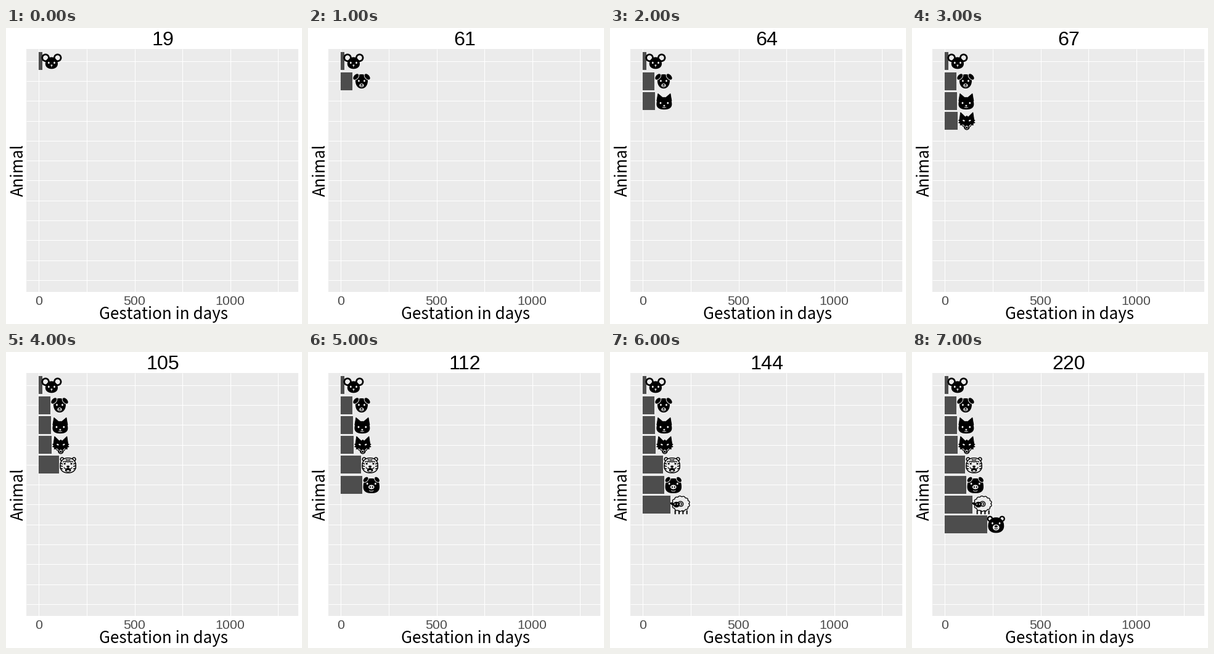
Recreate the animation shown at these times as a matplotlib script. Size 480 by 480 pixels, loop 8000 ms.

```python
import numpy as np
import matplotlib.pyplot as plt
from matplotlib.animation import FuncAnimation
from matplotlib.patches import Ellipse, Polygon, Rectangle

SIZE, DPI = 480, 72
PANEL, BAR, INK = "#EBEBEB", "#4D4D4D", "black"
LEFT, RIGHT, TOP, BOTTOM = 33, 474, 34, 428
ZERO, PER_DAY = 53.4, 0.3104
ROW, STEP = 53.8, 32.28

fig = plt.figure(figsize=(SIZE / DPI, SIZE / DPI), dpi=DPI, facecolor="white")
ax = fig.add_axes([0, 0, 1, 1])
ax.set(xlim=(0, SIZE), ylim=(SIZE, 0))
ax.set_axis_off()


def outline(y, rx, ry, power=2.0, taper=0.0):
    """Rounded head shape; taper widens it towards the chin."""
    t = np.linspace(0, 2 * np.pi, 80, endpoint=False)
    c, s = np.cos(t), np.sin(t)
    px = np.sign(c) * np.abs(c) ** (2 / power)
    py = np.sign(s) * np.abs(s) ** (2 / power)
    return np.c_[rx * px * (1 + taper * py), y + ry * py]


class Icon:
    """Draws shapes placed relative to one centre."""

    def __init__(self, x, y):
        self.centre = np.array([x, y])
        self.parts = []

    def add(self, patch):
        patch.set_zorder(3)
        self.parts.append(ax.add_patch(patch))

    def dot(self, x, y, rx, ry=None, color=INK, angle=0):
        self.add(Ellipse(self.centre + (x, y), 2 * rx, 2 * (ry or rx),
                         angle=angle, fc=color, ec="none"))

    def dots(self, x, y, rx, ry=None, color=INK, angle=0):
        for side in (-1, 1):
            self.dot(side * x, y, rx, ry, color, side * angle)

    def shape(self, points, fill=INK, edge="none", width=0):
        self.add(Polygon(self.centre + points, fc=fill, ec=edge, lw=width,
                         joinstyle="round"))

    def line(self, points, width=1.1, color=INK):
        self.add(Polygon(self.centre + points, closed=False, fill=False, ec=color,
                         lw=width, capstyle="round", joinstyle="round", snap=False))

    def arc(self, x, y, rx, ry, width=1.1, color=INK):
        """Half-ellipse curve; positive ry sags like a smile."""
        t = np.linspace(0, np.pi, 12)
        self.line(np.c_[x + rx * np.cos(t), y + ry * np.sin(t)], width, color)

    def eyes(self, x, y):
        self.dots(x, y, 1.4, 1.7, PANEL)

    def round_ears(self, x, y, r, hole):
        self.dots(x, y, r)
        self.dots(x, y, hole, color=PANEL)

    def pointed_ears(self, x, y):
        for side in (-1, 1):
            ear = np.array([(0.3 * x, y / 2), (x, y), (1.2 * x, 0)]) * (side, 1)
            self.shape(ear, edge=INK, width=1)

    def floppy_ears(self, x, y, rx, ry):
        self.dots(x, y, rx + 1, ry + 1, PANEL, 48)
        self.dots(x, y, rx, ry, angle=48)

    def nose(self, y):
        self.dot(0, y, 1.6, 1, PANEL)
        self.line([(0, y), (0, y + 2.8)], 0.9, PANEL)

    def muzzle(self, y, rx, ry):
        self.dot(0, y, rx, ry, PANEL)
        self.dot(0, y - 0.35 * ry, 0.46 * rx, 0.36 * ry)
        self.arc(0, y + 0.3 * ry, 0.4 * rx, 0.2 * ry)


def mouse(i):
    i.round_ears(9.8, -5.5, 6.7, 4)
    i.shape(outline(3, 10, 9.5, 2.1, 0.1))
    i.eyes(4.6, 2.6)
    i.nose(6.6)


def dog(i):
    i.shape(outline(0.5, 10, 11.5, 2.2, -0.08))
    i.floppy_ears(9.2, -7, 5.6, 3.3)
    i.eyes(4.5, -0.3)
    i.muzzle(7, 3.6, 3)


def cat(i):
    i.pointed_ears(10, -11.8)
    i.shape(outline(3.8, 12.4, 10, 2.4, 0.06))
    i.eyes(5.9, 3.3)
    i.nose(7.4)
    i.arc(0, 10, 2.6, 0.9, 0.8, PANEL)


def wolf(i):
    i.pointed_ears(10, -13.6)
    k = np.arange(28)
    t = np.pi / 2 + 2 * np.pi * k / len(k)
    r = 1 + 0.1 * (-1.0) ** k
    i.shape(np.c_[13 * r * np.cos(t), 1 + 8.8 * r * np.sin(t)])
    i.dot(0, 10, 4.8, 4.8)
    i.dots(4.9, -0.5, 1.9, 1.2, PANEL, -25)
    i.dots(5.2, 7.4, 2.8, 0.6, PANEL, -45)
    i.dot(0, 10.6, 2.4, 2.8, PANEL)
    i.dot(0, 11, 1.7, 1.7)


def tiger(i):
    i.dots(9.6, -9, 3.5)
    i.dots(9.6, -9, 1.9, color=PANEL)
    i.shape(outline(1, 12.6, 12, 2.3, 0.04), PANEL, INK, 1.5)
    for y in (-8.5, -5.8):
        i.arc(0, y, 3.2, 0.9, 1.5)
    for side in (-1, 1):
        i.arc(side * 6, -4.2, 2, -1.4)
        i.arc(side * 3.2, 4.2, 3.2, 2.2, 1.2)
        for y in (-2, 2, 6):
            i.line([(side * 9, y + 0.6), (side * 12.4, y - 0.4)], 1.5)
    i.dots(5.4, -1.8, 1.5)
    i.dot(0, 2.8, 2.5, 1.5)
    i.dot(0, 8.8, 4.8, 3)
    i.dot(0, 9.8, 2.4, 1.2, PANEL)


def pig(i):
    i.shape(outline(1.8, 13.2, 12, 2.5, 0.05))
    i.floppy_ears(9.2, -8.4, 4.8, 3)
    i.eyes(6.6, -1.6)
    i.dot(0, 3.8, 4.8, 3.5, PANEL)
    i.dots(1.9, 3.8, 1, 1.5)
    i.arc(0, 9.4, 3.2, 1.1, 0.9, PANEL)


def sheep(i):
    for x in np.linspace(-7, 12, 4):
        i.line([(x, 10), (x, 14.8)], 2)
    t = np.linspace(0, 2 * np.pi, 145)
    r = 0.91 + 0.11 * np.abs(np.sin(6.5 * t))
    i.line(np.c_[2 + 14.4 * r * np.cos(t), -1.4 + 12.4 * r * np.sin(t)], 1.3)
    i.dot(-12, -1.5, 3.4, 1.9, angle=20)
    i.dot(-5, 0, 5.4, 4.6)
    for x in (-7.4, -3.2):
        i.dot(x, -0.8, 1, color=PANEL)
    t = np.linspace(0, 3.4 * np.pi, 60)
    r = 5 - 0.36 * t
    i.line(np.c_[2 + r * np.cos(t - 2.6), -0.6 + r * np.sin(t - 2.6)], 1.3)


def bear(i):
    i.round_ears(9.8, -9.3, 4.8, 2.5)
    i.shape(outline(1, 12.9, 12.6, 2.2, 0.07))
    i.eyes(5.8, -2)
    i.muzzle(4.8, 5.4, 4.8)


ANIMALS = [(19, mouse), (61, dog), (64, cat), (67, wolf),
           (105, tiger), (112, pig), (144, sheep), (220, bear)]


def day_x(days):
    return ZERO + PER_DAY * days


def row_y(row):
    return ROW + STEP * row


def grid(xs, ys):
    ax.plot(xs, ys, color="white", lw=1.07, zorder=1, solid_capstyle="butt")


def draw_chart():
    ax.add_patch(Rectangle((LEFT, TOP), RIGHT - LEFT, BOTTOM - TOP, fc=PANEL, zorder=0))
    for days in range(0, 1251, 250):
        grid([day_x(days)] * 2, [TOP, BOTTOM])
    for row in range(12):
        grid([LEFT, RIGHT], [row_y(row)] * 2)
    for days in (0, 500, 1000):
        ax.text(day_x(days), 449, str(days), size=21.4, color="#4D4D4D",
                family="Liberation Sans", ha="center", va="baseline")
    label = dict(size=26, family="Noto Sans CJK JP", ha="center", va="baseline")
    ax.text(255.3, 472, "Gestation in days", **label)
    ax.text(28, 230.3, "Animal", rotation=90, rotation_mode="anchor", **label)


def draw_row(row, days, animal):
    y, end = row_y(row), day_x(days)
    bar = Rectangle((ZERO, y - 14.5), end - ZERO, 29, fc=BAR, ec="none", zorder=2)
    icon = Icon(end + 14.6, y)
    animal(icon)
    return [ax.add_patch(bar)] + icon.parts


draw_chart()
rows = [draw_row(k, *entry) for k, entry in enumerate(ANIMALS)]
title = ax.text(254, 27.6, "", size=32.1, family="Liberation Sans",
                ha="center", va="baseline")


def update(frame):
    title.set_text(str(ANIMALS[frame][0]))
    for k, parts in enumerate(rows):
        for part in parts:
            part.set_visible(k <= frame)
    return [title]


anim = FuncAnimation(fig, update, frames=len(ANIMALS), interval=1000,
                     init_func=lambda: update(0), repeat=True)
plt.show()
```
